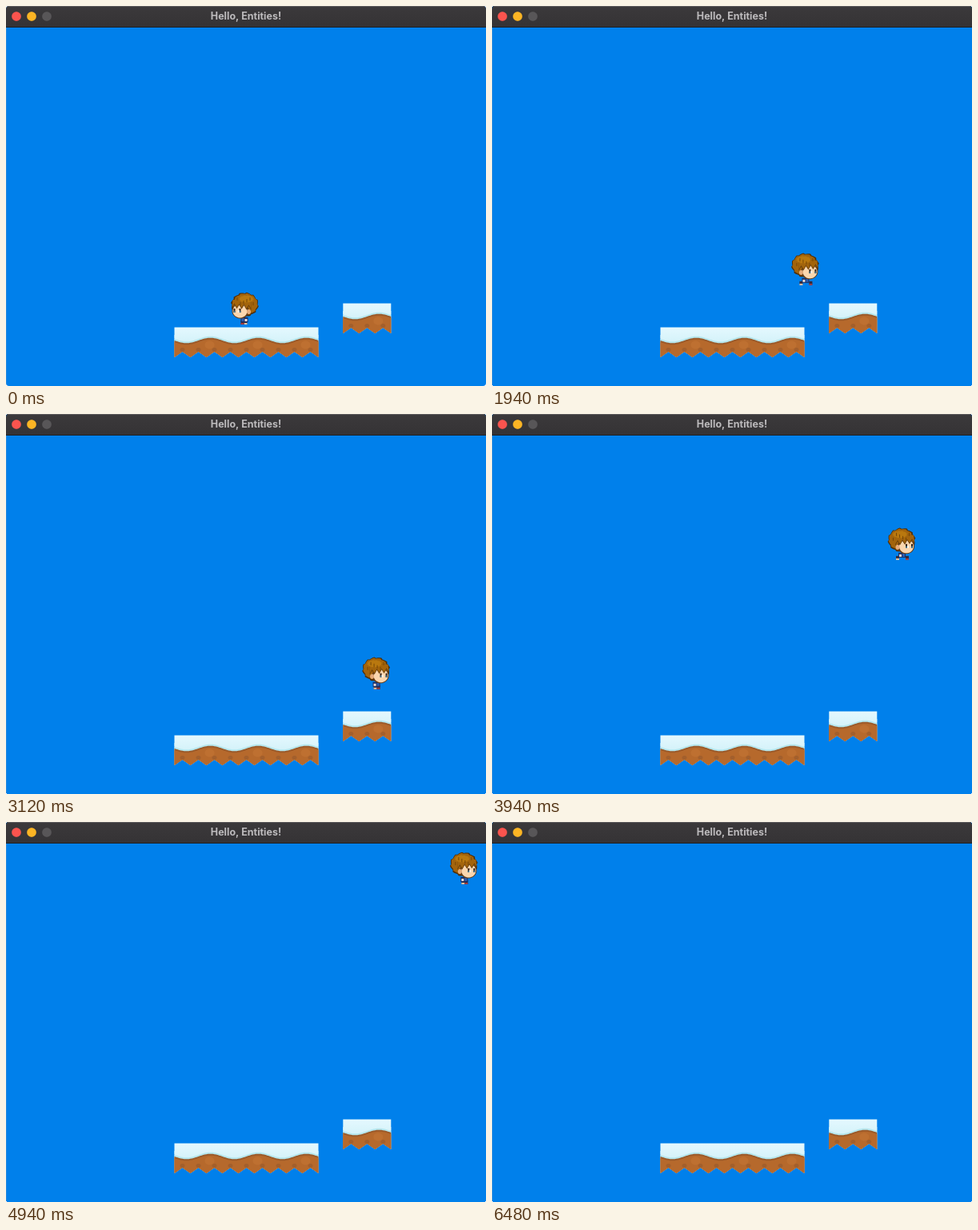
An HTML page with a canvas for the animation above (6510 ms loop, 600 by 476 pixels).

```html
<!DOCTYPE html>
<html lang="en">
<head>
<meta charset="utf-8">
<title>Hello, Entities!</title>
<style>
  html, body { margin: 0; width: 100%; height: 100%; overflow: hidden; background: #fff; }
  canvas { display: block; }
</style>
</head>
<body>
<canvas id="stage" width="600" height="476"></canvas>
<script>
const ctx = document.getElementById('stage').getContext('2d');
const LOOP = 6.51, SPEED = 60.3, GROUND = 359, LEDGE = 329;

function rect(color, x, y, w, h) {
  ctx.fillStyle = color;
  ctx.fillRect(x, y, w, h);
}

// Ellipse whose rim can carry small spikes.
function blob(color, cx, cy, rx, ry, spike = 0) {
  ctx.fillStyle = color;
  ctx.beginPath();
  for (let i = 0; i < 48; i++) {
    const a = i * Math.PI / 24;
    const r = 1 + spike * (i % 4 / 2 - 1);
    ctx.lineTo(cx + rx * r * Math.cos(a), cy + ry * r * Math.sin(a));
  }
  ctx.fill();
}

function shade(top, bottom, height) {
  const g = ctx.createLinearGradient(0, 0, 0, height);
  g.addColorStop(0, top);
  g.addColorStop(1, bottom);
  return g;
}

const wave = x => 16.5 + 3.3 * Math.sin(x * Math.PI / 30);

// Ground between the snow line, shifted by dy, and the toothed bottom.
function earth(color, width, dy) {
  ctx.fillStyle = color;
  ctx.beginPath();
  for (let x = 0; x <= width; x += 2) ctx.lineTo(x, wave(x) + dy);
  for (let x = width; x >= 0; x -= 10) ctx.lineTo(x, x % 20 ? 30.5 : 37.5);
  ctx.fill();
}

function platform(x, y, width) {
  ctx.save();
  ctx.translate(x, y);
  const snow = shade('#e4f8fe', '#d3f2f9', 20);
  rect(snow, 0, 0, width, 14);
  earth(snow, width, -7);
  earth('#b5e6ed', width, -2);
  earth('#9b5a2a', width, 0);
  earth('#b6692c', width, 2);
  for (let c = 10; c < width; c += 20) blob('#a35f2c', c, 28, 3, 2.5);
  for (let c = 44; c < width; c += 60) blob('#be7031', c, 22, 6, 5);
  ctx.restore();
}

// Strands hanging over the forehead.
function fringe(color, drop) {
  ctx.fillStyle = color;
  ctx.beginPath();
  ctx.moveTo(-8, 9);
  for (let i = 0; i <= 8; i++) ctx.lineTo(-8 + i * 3, (i % 2 ? 16 : 21) + drop - i * 0.3);
  ctx.lineTo(15, 9);
  ctx.fill();
}

function hero(x, y, dir, step) {
  ctx.save();
  ctx.translate(x, y);
  ctx.scale(dir, 1);

  // legs and body
  const stride = step ? 4 : 0;
  for (const side of [-1, 1]) {
    const foot = 1 + side * (2 + stride);
    rect('#33283a', foot - 2, 35, 4, 5 - stride / 4);
    rect(side < 0 ? '#e3c3a6' : '#a33a40', foot - 2, 38, 4, 2);
  }
  rect('#1d2d62', -4, 31, 9, 6);
  rect('#2d5cae', 1, 32, 3, 4);
  rect('#e9dfdd', -3, 33, 3, 3);

  // hair and face
  blob('#4e2d07', 0, 15, 17, 15, 0.06);
  blob('#a3640c', -0.5, 14.5, 15.5, 13.5, 0.05);
  blob('#633a15', 5.5, 23, 10.5, 9.5);
  blob('#fbd6ae', 6, 23, 9, 8.5);
  blob('#e5ab7b', -5, 24, 2.5, 3);
  fringe('#633a0a', 1);
  fringe('#a3640c', -0.5);
  blob('#b9780f', -2, 8, 9, 4.5, 0.1);
  for (let i = 0; i < 6; i++) rect('#774707', i * 4 - 11, 12 - i * 7 % 4 * 2, 1, 4);

  // eyes
  for (const ex of [5, 12]) {
    rect('#322019', ex, 20, 2, 5);
    rect('#477890', ex, 23, 2, 2);
  }
  rect('#fff7ec', 7, 22, 2, 3);
  ctx.restore();
}

function heroTop(t) {
  if (t > 2.52) {
    const s = t - 3.12;
    return s < -0.098 ? LEDGE : 305 - 239.3 * s + 50.9 * s * s;
  }
  const u = Math.max(0, t - 1.52);
  return GROUND - 180 * u + 150 * u * u;
}

function titleBar() {
  rect(shade('#3b393b', '#353335', 26), 0, 0, 600, 26);
  rect('#5c5a5c', 0, 0, 600, 1);
  rect('#1c2026', 0, 26, 600, 1);
  ['#fb544e', '#fdb524', '#585658'].forEach((c, i) => blob(c, 13 + i * 19, 13, 5.8, 5.8));
  ctx.fillStyle = '#bdbbbd';
  ctx.font = '700 12.5px Inter, sans-serif';
  ctx.textAlign = 'center';
  ctx.fillText('Hello, Entities!', 300, 17);
}

function frame(now) {
  const t = now / 1000 % LOOP;
  rect('#0080eb', 0, 0, 600, 476);
  platform(210.5, 402.5, 180);
  platform(421.3, 372.5, 60);

  const moving = t > 0.4;
  const x = 298.5 + SPEED * Math.max(0, t - 0.4);
  const step = moving && Math.floor((t - 1) / 0.2 + 0.35) % 2 !== 0;
  hero(x, heroTop(t), moving ? 1 : -1, step);

  titleBar();
  rect('rgba(90,150,200,.4)', 0, 27, 1, 449);
  requestAnimationFrame(frame);
}

// Rounded window corners.
ctx.beginPath();
ctx.roundRect(0, 0, 600, 476, 4);
ctx.clip();
requestAnimationFrame(frame);
</script>
</body>
</html>
```
